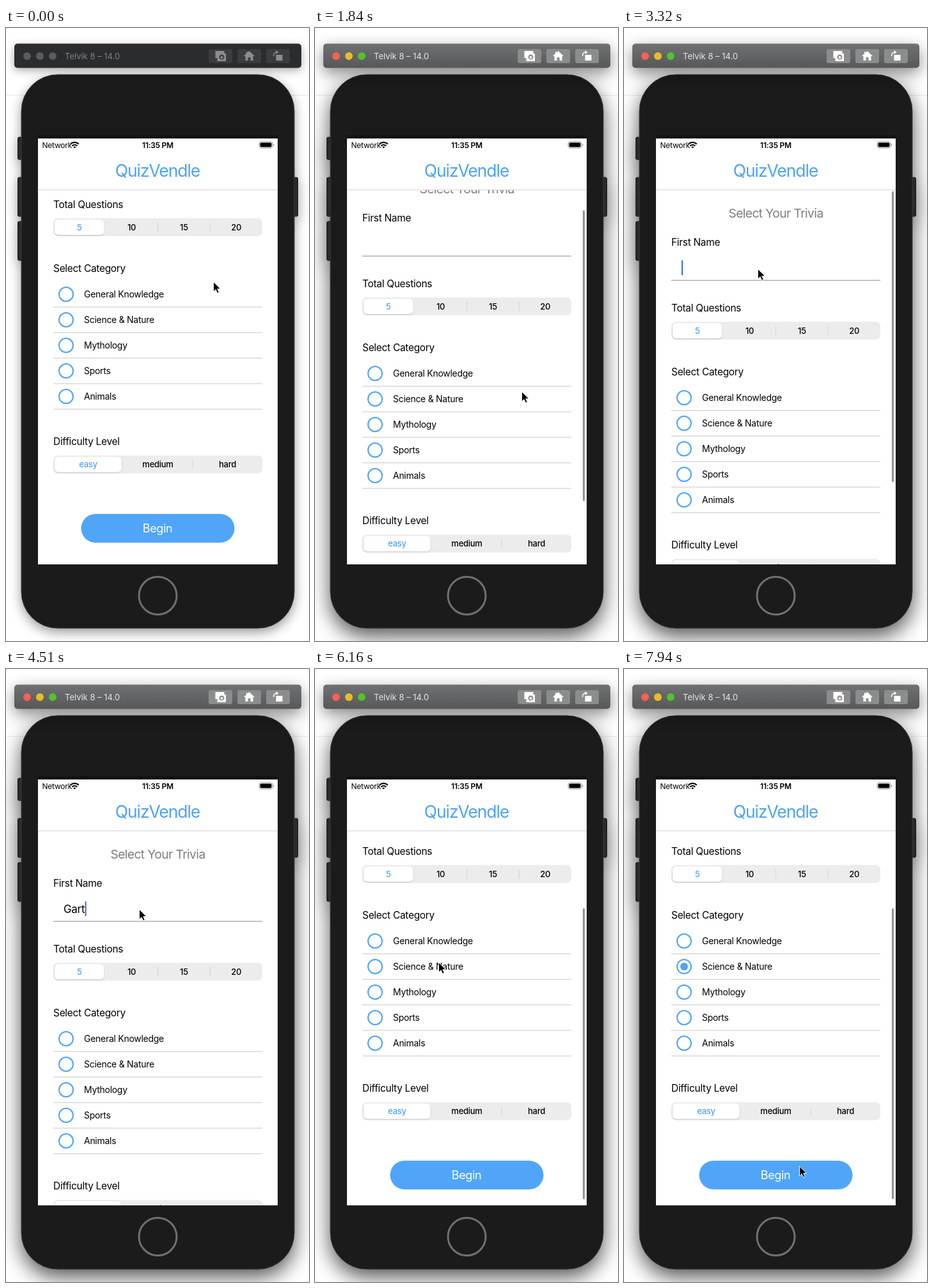
An HTML page for the animation above (8000 ms loop, 474 by 960 pixels).

```html
<!DOCTYPE html>
<html lang="en">
<head>
<meta charset="utf-8">
<title>Quiz setup</title>
<style>
  html, body { margin: 0; width: 100%; height: 100%; overflow: hidden; background: #fff; }
  svg { display: block; width: 100%; height: 100%; }
  text { font-family: Inter, "Open Sans", sans-serif; letter-spacing: -.02em; }
  .mid { text-anchor: middle; }
  .label { font-size: 15.5px; }
  .row { font-size: 14px; }
  .seg { font-size: 13px; font-weight: 500; }
  .blue { fill: #4da3f7; }
  .ring { fill: #fff; stroke: #4da3f7; stroke-width: 2; }

  #device { filter: drop-shadow(0 6px 9px #0006); }
  #bar { fill: #2b2c2d; stroke: #1b1b1c; color: #8d8d8e; filter: drop-shadow(0 4px 7px #0005); }
  #bar * { stroke: none; }
  #bar .light { fill: #5b5b5c; }
  #bar .key { fill: #3b3c3d; }
  #bar .name { fill: #808182; font-size: 13px; letter-spacing: 0; }
  #bar .icon { fill: currentColor; }
  #bar .arc { fill: none; stroke: currentColor; stroke-width: 1.5; }

  .active #device { filter: drop-shadow(0 12px 16px #000a); }
  .active #bar { fill: url(#metal); color: #fff; filter: drop-shadow(0 8px 12px #0007); }
  .active #bar .light { fill: var(--c); }
  .active #bar .key { fill: #8b8c8c; }
  .active #bar .name { fill: #e6e6e6; }
</style>
</head>
<body>
<svg id="stage" viewBox="0 0 474 960">
  <defs>
    <linearGradient id="metal" x2="0" y2="1">
      <stop stop-color="#707172"/><stop offset="1" stop-color="#565859"/>
    </linearGradient>
    <clipPath id="view"><path d="M50 254H425V840H50z"/></clipPath>
    <filter id="soft" x="-10%" y="-30%" width="120%" height="170%">
      <feDropShadow dx="0" dy="1" stdDeviation="1" flood-opacity=".2"/>
    </filter>
  </defs>

  <path d="M0 105.500H474" stroke="#e9e9e9"/>

  <g id="device">
    <g fill="#2a2a2b" stroke="#161617">
      <rect x="18.500" y="171" width="9" height="35" rx="2"/>
      <rect x="18.500" y="234" width="9" height="61" rx="2"/>
      <rect x="18.500" y="303" width="9" height="61" rx="2"/>
      <rect x="447" y="234" width="9.500" height="61" rx="2"/>
    </g>
    <rect x="24" y="73" width="427" height="867" rx="57" fill="#1b1b1b" stroke="#3c3c3d"/>
  </g>
  <path d="M50 168H425V173H50z" fill="#121212"/>
  <circle cx="237.500" cy="889" r="29.500" fill="none" stroke="#707070" stroke-width="3"/>

  <g id="bar"></g>

  <path d="M50 173H425V840H50z" fill="#fff"/>
  <g clip-path="url(#view)">
    <path d="M50 254H425V840H50z" fill="#f0f0f0"/>
    <g id="page"></g>
    <rect id="thumb" x="419" width="3" rx="1.500" fill="#929292"/>
  </g>

  <path d="M50 253.500H425" stroke="#d2d2d2"/>
  <text x="56.500" y="187.500" font-size="12">Network</text>
  <text x="237.500" y="187.500" font-size="12" font-weight="600" class="mid">11:35 PM</text>
  <g fill="none" stroke="#000" stroke-width="2.200">
    <path d="M100.700 181.700a9.500 9.500 0 0 1 13.200 0M103.300 184.600a5.800 5.800 0 0 1 8 0"/>
    <path d="M107.300 188.500l-2-2.200a3 3 0 0 1 4 0z" fill="#000" stroke="none"/>
    <rect x="396" y="178" width="21" height="10" rx="3" stroke="#999" stroke-width="1"/>
    <rect x="397.500" y="179.500" width="18" height="7" rx="1.800" fill="#000" stroke="none"/>
    <path d="M418.700 181.500v3" stroke="#999" stroke-width="1.300"/>
  </g>
  <text x="237" y="233" font-size="26.500" class="mid blue" style="letter-spacing:-.04em">QuizVendle</text>

  <path id="pointer" d="M0 0V15.500l3.600-3.300 2.500 5.600 2.700-1.200-2.500-5.400H11.300z" stroke="#fff"/>
</svg>

<script>
const $ = id => document.getElementById(id);

// Simulator title bar
const lights = ['#ff5f57', '#e7bd2c', '#54c22b'].map((c, i) =>
  `<circle class="light" style="--c:${c}" cx="${33 + i * 20}" cy="44" r="6"/>`).join('');
const icons = [
  `<path class="icon" fill-rule="evenodd" d="M-8-8H6V-4H8.500V8H-5V3H-8zM2-2.500a4 4 0 1 0 .01 0zM2 0a2 2 0 1 1-.01 0z"/>`,
  `<path class="icon" d="M0-8L8.500 0H6V7H2V2H-2V7H-6V0H-8.500L-4.500-4V-7H-3V-5.300z"/>`,
  `<path class="icon" d="M-3-2H7V7H-3zM-3-9L1-6-3-3z"/><path class="arc" d="M-7 0q0-6 5-6"/>`
].map((icon, i) => `<g transform="translate(${335.5 + i * 45} 44)">
  <rect class="key" x="-18.500" y="-11" width="37" height="22" rx="3"/>${icon}</g>`).join('');
$('bar').innerHTML = `<rect x="13" y="24.500" width="449" height="38" rx="5"/>${lights}
  <text class="name" x="92" y="49">Telvik 8 – 14.0</text>${icons}`;

// Scrolling form
const label = (y, words) => `<text class="label" x="74" y="${y}">${words}</text>`;

function segments(y, names) {
  const w = 327 / names.length;
  const center = i => 74 + w * (i + .5);
  return `<rect x="74" y="${y}" width="327" height="28" rx="7" fill="#ececec"/>
    <rect x="76" y="${y + 2}" width="${w - 4.5}" height="24" rx="6" fill="#fff" filter="url(#soft)"/>` +
    names.map((name, i) =>
      (i > 1 ? `<rect x="${74 + w * i - .5}" y="${y + 7}" width="1" height="14" fill="#d4d4d4"/>` : '') +
      `<text class="seg mid ${i ? '' : 'blue'}" x="${center(i)}" y="${y + 18.7}">${name}</text>`).join('');
}

const rows = ['General Knowledge', 'Science &amp; Nature', 'Mythology', 'Sports', 'Animals'].map((name, i) => {
  const y = 579 + i * 40;
  return `<circle class="ring" cx="94" cy="${y}" r="11"/>
    <text class="row" x="122" y="${y + 4.6}">${name}</text>
    <rect x="74" y="${y + 19.5}" width="327" height="1" fill="#c6c6c6"/>`;
}).join('');

$('page').innerHTML = `<rect x="50" y="254" width="375" height="900" fill="#fff"/>
  <text class="mid" x="237.500" y="296.500" font-size="19.300" fill="#7d7d7d" style="letter-spacing:-.032em">Select Your Trivia</text>
  ${label(340.5, 'First Name')}
  <text id="name" x="90" y="382" font-size="17"></text>
  <rect id="caret" y="364" width="2" height="23" fill="#4267d8"/>
  <rect x="74" y="394.500" width="327" height="1.500" fill="#b0b0b0"/>
  ${label(444.3, 'Total Questions')}${segments(460, [5, 10, 15, 20])}
  ${label(543.7, 'Select Category')}${rows}
  <circle id="dot" class="blue" cx="94" cy="619" r="6"/>
  ${label(815.3, 'Difficulty Level')}${segments(831.5, ['easy', 'medium', 'hard'])}
  <rect x="117.500" y="923" width="240" height="45" rx="22.500" fill="#50a5f8"/>
  <text class="mid" x="237" y="952" font-size="18" fill="#fff">Begin</text>`;

// Motion: [time, values...]
const scrollKeys = [
  [1540, 162], [1690, 112], [1840, 37.5], [1990, 4], [2130, -9], [2280, -6], [2430, -2], [2730, 0],
  [5110, 0], [5260, 95], [5410, 138], [5560, 151], [5710, 153]
];
const pointerKeys = [
  [0, 324, 397], [1540, 323, 398], [1690, 323, 480], [1840, 323, 570], [1990, 323, 592], [2280, 323, 597],
  [2430, 323, 597], [2730, 245, 432], [3030, 209, 377], [4660, 208, 376], [4960, 295, 490], [5110, 295, 515],
  [5260, 295, 411], [5410, 295, 385], [5560, 290, 388], [6010, 193, 459], [6610, 193, 459], [6910, 96, 463],
  [7350, 96, 463], [7500, 125, 530], [7800, 268, 755], [7940, 274, 779]
];

function sample(keys, t) {
  const next = keys.findIndex(k => k[0] > t);
  if (next === 0) return keys[0].slice(1);
  if (next < 0) return keys[keys.length - 1].slice(1);
  const a = keys[next - 1], b = keys[next];
  const p = (t - a[0]) / (b[0] - a[0]);
  return a.slice(1).map((v, i) => v + (b[i + 1] - v) * p);
}

function held(t) {
  if (t < 500) return 0;
  if (t < 1690) return 1540;
  return 1690 + Math.floor((t - 1678) / 148.7) * 148.7;
}

const show = (id, on) => $(id).setAttribute('visibility', on ? 'visible' : 'hidden');
const typedAt = [3900, 4200, 4350, 4500];

function draw(t) {
  const now = held(t);
  const scroll = Math.round(sample(scrollKeys, now)[0] * 2) / 2;
  const [x, y] = sample(pointerKeys, now).map(Math.round);
  $('stage').classList.toggle('active', t >= 1100);
  $('page').setAttribute('transform', `translate(0 ${-scroll})`);
  $('pointer').setAttribute('transform', `translate(${x + .5} ${y + .5})`);

  $('thumb').setAttribute('y', 255.5 + Math.max(0, scroll) * .78);
  $('thumb').setAttribute('height', 455.5 + Math.min(0, scroll));
  show('thumb', t >= 1690 && t < 4360 || t >= 5260);

  const typed = 'Gart'.slice(0, typedAt.filter(at => t >= at).length);
  if ($('name').textContent !== typed) $('name').textContent = typed;
  $('caret').setAttribute('x', 90 + (typed && $('name').getComputedTextLength() + .5));
  show('caret', t >= 3320 && t < 5260);
  show('dot', t >= 7060);
}

const start = performance.now();
function frame() {
  draw((performance.now() - start) % 8000);
  requestAnimationFrame(frame);
}
frame();
</script>
</body>
</html>
```
